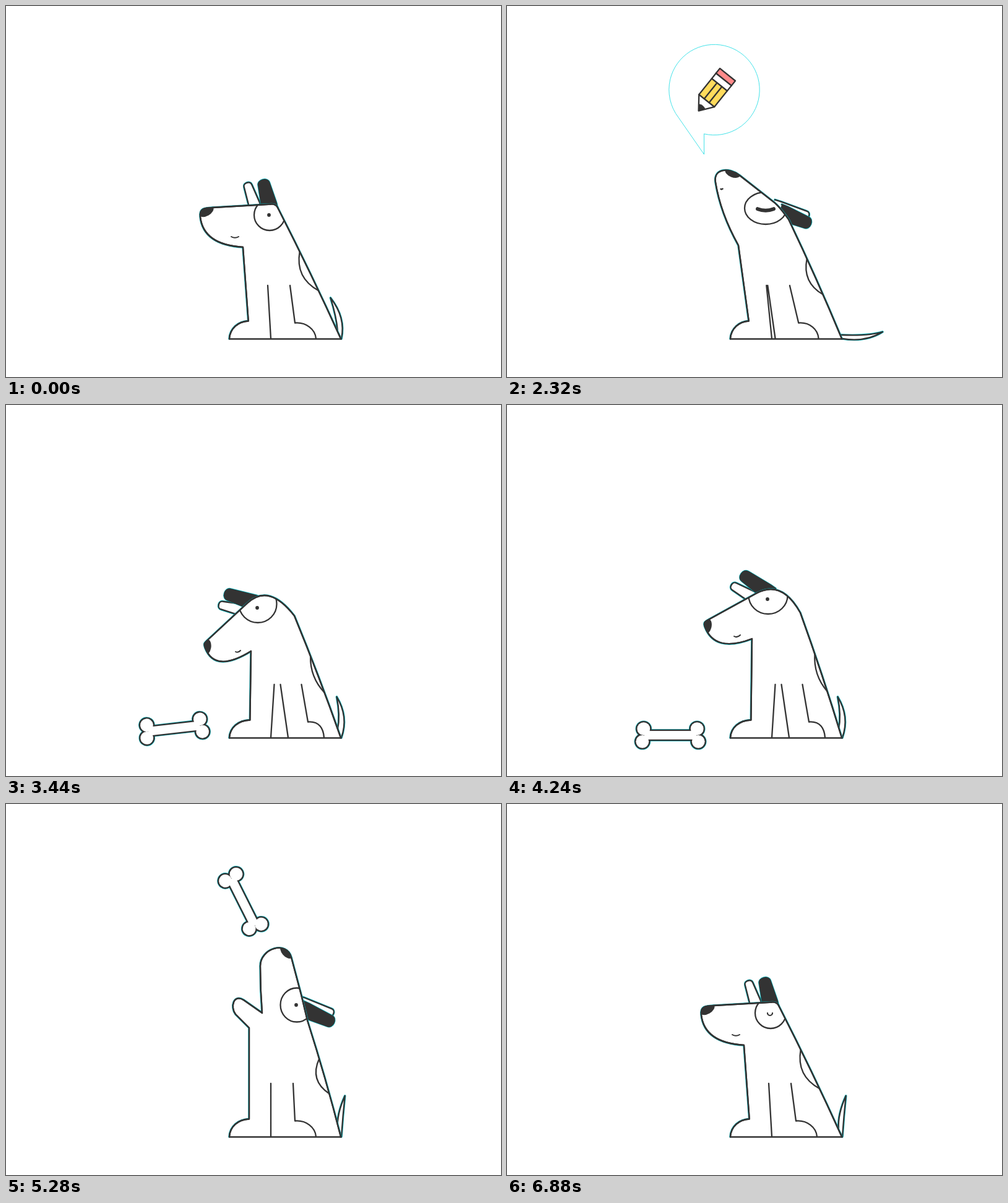
Animation, 800 px wide and 600 px high, one loop 6.96 s. Source, as an HTML page with a canvas:

```html
<!DOCTYPE html>
<html lang="en">
<head>
<meta charset="utf-8">
<title>Dog and bone</title>
<style>
  html, body { margin: 0; width: 100%; height: 100%; overflow: hidden; background: #fff; }
  canvas { display: block; }
</style>
</head>
<body>
<canvas id="stage" width="800" height="600"></canvas>
<script>
const ctx = document.getElementById('stage').getContext('2d');
const INK = '#333', FRINGE = '#00b4bd', LINE = 2.3;
const LOOP = 6960, STEP = 80, RAD = Math.PI / 180;
const { sin, cos, min, max, hypot } = Math;

// neck, chin, snout, muzzle, brow, nape: outline from throat to back (chin and brow are control points)
// near ear: x, y, length, angle; far ear: x, y, length; mouth: x, y, half width, line width
// turn: how far the body faces the viewer; gape: how far the jaw is open
const rest = {
  neck: [383, 390], chin: [319, 386], snout: [314, 341], muzzle: [334, 326], brow: [437, 320], nape: [440, 328],
  near: [425, 321, 38, -104], far: [401, 320, 34], patch: [426, 338, 25, 25],
  mouth: [370, 373, 6, 2], nose: -30, turn: 0, gape: 0
};
const howl = {
  neck: [369, 410], chin: [337, 312], snout: [330, 266], muzzle: [366, 261], brow: [409, 313], nape: [432, 347],
  near: [423, 332, 48, 17.5], far: [416, 321, 52], patch: [404, 323, 25, 25],
  mouth: [340, 271, 0, 7], nose: 28, turn: 0, gape: 0
};
const lowering = {
  neck: [374, 387], chin: [345, 335], snout: [337, 285], muzzle: [376, 274], brow: [440, 324], nape: [455, 345],
  near: [449, 336, 42, 22], far: [440, 325, 48], patch: [418, 327, 34, 26],
  mouth: [347, 296, 1.5, 2.5], nose: 22, turn: 0.2, gape: 0
};
const lookDown = {
  neck: [396, 398], chin: [338, 434], snout: [322, 393], muzzle: [326, 380], brow: [425, 288], nape: [466, 341],
  near: [402, 320, 48, -162], far: [379, 331, 34], patch: [407, 322, 30.5, 30],
  mouth: [375, 399, 4, 2], nose: -80, turn: 1, gape: 0
};
const lookAhead = {
  neck: [396, 378], chin: [336, 401], snout: [320, 359], muzzle: [326, 347], brow: [444, 282], nape: [474, 336],
  near: [419, 301, 46, -145], far: [394, 309, 34], patch: [422, 308, 31.5, 30],
  mouth: [372, 374, 5, 2], nose: -75, turn: 1, gape: 0
};
const bite = {
  neck: [393, 362], chin: [411, 300], snout: [411, 262], muzzle: [461, 248], brow: [478, 312], nape: [487, 350],
  near: [485, 334, 46, 24], far: [480, 322, 50], patch: [470, 325, 26.5, 27.5],
  mouth: [414, 338, 0, 2], nose: 50, turn: 0, gape: 1
};

function mix(a, b, k) {
  if (typeof a === 'number') return a + (b - a) * k;
  if (Array.isArray(a)) return a.map((v, i) => mix(v, b[i], k));
  return Object.fromEntries(Object.keys(a).map(key => [key, mix(a[key], b[key], k)]));
}
const smooth = k => k * k * (3 - 2 * k);
const ramp = (t, from, to) => max(0, min(1, (t - from) / (to - from)));

function track(t, keys) {
  const next = keys.findIndex(key => key[0] > t);
  if (next === 0) return keys[0][1];
  if (next < 0) return keys[keys.length - 1][1];
  const [t0, a] = keys[next - 1], [t1, b] = keys[next];
  return mix(a, b, smooth((t - t0) / (t1 - t0)));
}

const POSES = [[640, rest], [1120, howl], [2160, howl], [2320, lowering], [2640, lookAhead],
  [2880, lookAhead], [3200, lookDown], [3520, lookDown], [3920, lookAhead], [4400, lookAhead],
  [4960, bite], [5440, bite], [5680, rest]];
const BUBBLE = [[800, 0], [960, 0.75], [1120, 1.022], [1360, 1], [2640, 1], [2800, 0.985], [3040, 0]];
const BLINKS = [[960, 1200], [1920, 2160], [6880, LOOP]];
const during = (t, from, to) => t >= from && t < to;

function stroke(path, width = LINE, color = INK) {
  ctx.lineWidth = width;
  ctx.strokeStyle = color;
  ctx.stroke(path);
}

function fill(path, color) {
  ctx.fillStyle = color;
  ctx.fill(path);
}

function outlined(path, color = '#fff') {
  stroke(path, 3.6, FRINGE);
  fill(path, color);
  stroke(path);
}

function ellipse(x, y, rx, ry, degrees = 0) {
  const path = new Path2D();
  path.ellipse(x, y, rx, ry, degrees * RAD, 0, 7);
  return path;
}

function drawEar(x, y, length, degrees, base, tip, color) {
  const cap = length - tip / 2, path = new Path2D();
  path.moveTo(-10, -base);
  path.lineTo(0, -base);
  path.lineTo(cap, -tip);
  path.bezierCurveTo(cap + tip * 1.1, -tip, cap + tip * 1.1, tip, cap, tip);
  path.lineTo(0, base);
  path.lineTo(-10, base);
  ctx.save();
  ctx.translate(x, y);
  ctx.rotate(degrees * RAD);
  outlined(path, color);
  ctx.restore();
}

function drawTail(t) {
  const clock = t < 2000 ? t + LOOP : t;
  const swing = (clock - 178) / 400 * 2 * Math.PI;
  const lift = during(t, 2160, 2800) ? sin((t - 2160) / 320 * Math.PI) ** 2 : 0;
  const droop = track(t, [[720, 0], [960, 1], [2880, 1], [3120, 0]]);
  // tip, outer control, inner control, inner base
  const wagging = [548.5 - 25 * cos(swing), 472, 549 + 5 * sin(swing + 0.35), 504,
                   539 + 6 * sin(swing - 0.7), 502, 536, 525];
  const lying = [613 - 6 * lift, 538 - 11 * lift, 580, 538 + 6 * lift, 555 + 30 * lift, 526 + 8 * lift, 539, 532];
  const [tx, ty, ox, oy, ix, iy, bx, by] = mix(wagging, lying, droop);
  const path = new Path2D();
  path.moveTo(542, 538);
  path.quadraticCurveTo(ox, oy, tx, ty);
  path.quadraticCurveTo(ix, iy, bx, by);
  outlined(path);
}

const backControl = ([x, y]) => [(x + 541) / 2 + 3, (y + 538) / 2];

// Point reached from a by continuing the direction b -> a.
function extend(a, b, distance) {
  const length = hypot(a[0] - b[0], a[1] - b[1]);
  return mix(a, b, -distance / length);
}

function bodyPath({ neck, chin, snout, muzzle, brow, nape, turn, gape }, lean) {
  const jaw = (dx, dy) => [neck[0] + dx * gape, neck[1] + dy * gape];
  const roundness = 0.55 * hypot(snout[0] - muzzle[0], snout[1] - muzzle[1]);
  const path = new Path2D();
  path.moveTo(361, 538);
  path.bezierCurveTo(362, 522, 375, 510, 393 + lean / 4, 509.5);
  path.lineTo(...neck);
  path.lineTo(...jaw(-22, -22));
  path.bezierCurveTo(...jaw(-31, -34), ...jaw(-25, -55), ...jaw(-9, -45));
  path.lineTo(...jaw(21, -24));
  path.quadraticCurveTo(...chin, ...snout);
  path.bezierCurveTo(...extend(snout, chin, roundness), ...extend(muzzle, brow, roundness), ...muzzle);
  path.lineTo(...mix(muzzle, brow, 0.92 - 0.27 * turn));
  path.quadraticCurveTo(...brow, ...nape);
  path.quadraticCurveTo(...backControl(nape), 541, 538);
  return path;
}

function detailPath({ nape, turn }, lean) {
  const control = backControl(nape);
  const onBack = k => mix(mix(nape, control, k), mix(control, [541, 538], k), k);
  const [x0, y0] = onBack(0.33), [x1, y1] = onBack(0.63);
  const bulge = (25 - 12 * turn) / hypot(x1 - x0, y1 - y0);
  const heel = 467 + 21 * turn, path = new Path2D();
  path.moveTo(x0, y0);
  path.quadraticCurveTo((x0 + x1) / 2 - (y1 - y0) * bulge, (y0 + y1) / 2 + (x1 - x0) * bulge, x1, y1);
  path.moveTo(428 + lean, 452);
  path.lineTo(428, 538);
  path.moveTo(428 + lean + 10 * turn, 452);
  path.lineTo(428 + 28 * turn, 538);
  path.moveTo(464 + lean + 8 * turn, 452);
  path.lineTo(heel, 512.5);
  path.bezierCurveTo(heel + 18, 511, heel + 33 - 8 * turn, 523, 501 + 13 * turn, 538);
  path.moveTo(361, 538.5);
  path.lineTo(542, 538.5);
  return path;
}

function drawEye(t, { patch, nose, turn }) {
  const x = patch[0] - 1, y = patch[1] + 6 * turn, path = new Path2D();
  if (during(t, 2160, 2480)) {
    path.moveTo(x - 12, y);
    path.quadraticCurveTo(x + 1, y + 5, x + 14, y);
    stroke(path, 6);
  } else if (BLINKS.some(([from, to]) => during(t, from, to))) {
    const tilt = nose + 30;
    path.arc(x, y, 4 + tilt / 30, tilt * RAD, (tilt + 180) * RAD);
    stroke(path, 2.2);
  } else {
    fill(ellipse(x, y, 2.9, 2.9), INK);
  }
}

function drawDog(t) {
  const dog = track(t, POSES), { near, far, muzzle, nose, mouth, turn } = dog;
  const lean = (dog.neck[0] - 393) / 2 + 4 * turn;
  drawTail(t);
  drawEar(...far, near[3] - 5, 9, 6.5, '#fff');
  drawEar(...near, 12, 9, INK);

  const body = bodyPath(dog, lean);
  outlined(body);
  ctx.save();
  ctx.clip(body);
  stroke(ellipse(...dog.patch));
  fill(ellipse(muzzle[0] - 12 * cos(nose * RAD), muzzle[1] - 12 * sin(nose * RAD), 13, 7.5, nose), INK);
  ctx.restore();
  stroke(body);
  stroke(detailPath(dog, lean));

  const [x, y, half, width] = mouth, smile = new Path2D();
  smile.moveTo(x - half, y);
  smile.quadraticCurveTo(x, y + half * 0.6, x + half, y - 2 * turn);
  stroke(smile, width);
  drawEye(t, dog);
}

function drawPencil() {
  ctx.save();
  ctx.translate(356.5, 111);
  ctx.rotate(38.7 * RAD);
  const wood = new Path2D('M-16 54L0 75L16 54Z');
  fill(wood, '#fff');
  fill(new Path2D('M-7 66L0 75L7 66Q0 62-7 66Z'), INK);
  stroke(wood);
  for (const [y, height, color] of [[0, 10, '#ff8a8a'], [10, 11, '#fff'], [21, 33, '#ffdb5c']]) {
    const band = new Path2D();
    band.rect(-16, y, 32, height);
    fill(band, color);
    stroke(band);
  }
  stroke(new Path2D('M-5 21V54M5 21V54'));
  ctx.restore();
}

function drawBubble(t) {
  const scale = track(t, BUBBLE);
  if (scale <= 0) return;
  ctx.save();
  ctx.translate(318, 240);
  ctx.scale(scale, scale);
  ctx.translate(-318, -240);
  const bubble = new Path2D();
  bubble.moveTo(318.5, 239.5);
  bubble.lineTo(318.5, 207);
  bubble.arc(335, 135.5, 73.2, 1.8, 2.49, true);
  bubble.closePath();
  fill(bubble, '#fff');
  stroke(bubble, 0.9, '#2fdfe6');
  drawPencil();
  ctx.restore();
}

// Drops from the bubble with one small hop, later flies up spinning into the mouth.
function bonePose(t) {
  if (t < 4380) {
    const drop = ramp(t, 2880, 3280), hop = ramp(t, 3280, 3520), settle = ramp(t, 3280, 3600);
    return {
      x: 335 - 56 * drop - 15 * settle,
      y: 135 + 399 * drop ** 2 - 49 * hop * (1 - hop),
      degrees: -70 + 57 * drop + 13 * settle,
      scale: ramp(t, 2800, 2960)
    };
  }
  const flight = (t - 4380) / 900;
  return {
    x: 264 + 119 * flight,
    y: 140 + 0.00072 * (t - 5120) ** 2,
    degrees: 243.4 * flight,
    scale: 1 - ramp(t, 5400, 5520)
  };
}

function drawBone(t) {
  if (!during(t, 2880, 5520)) return;
  const { x, y, degrees, scale } = bonePose(t);
  ctx.save();
  ctx.translate(x, y);
  ctx.rotate(degrees * RAD);
  ctx.scale(scale, scale);
  for (const [grow, color] of [[1.8, FRINGE], [1.2, INK], [-1.1, '#fff']]) {
    ctx.fillStyle = color;
    ctx.fillRect(-42, -8 - grow, 84, 16 + 2 * grow);
    for (const side of [-1, 1]) {
      for (const edge of [-1, 1]) {
        fill(ellipse(side * (44.2 + edge), edge * 10.3, 11.5 + grow, 11.5 + grow), color);
      }
    }
  }
  ctx.restore();
}

const start = performance.now();

function render() {
  const t = Math.floor((performance.now() - start) % LOOP / STEP) * STEP;
  ctx.clearRect(0, 0, 800, 600);
  drawBubble(t);
  drawBone(t);
  drawDog(t);
  requestAnimationFrame(render);
}

ctx.lineCap = ctx.lineJoin = 'round';
render();
</script>
</body>
</html>
```
